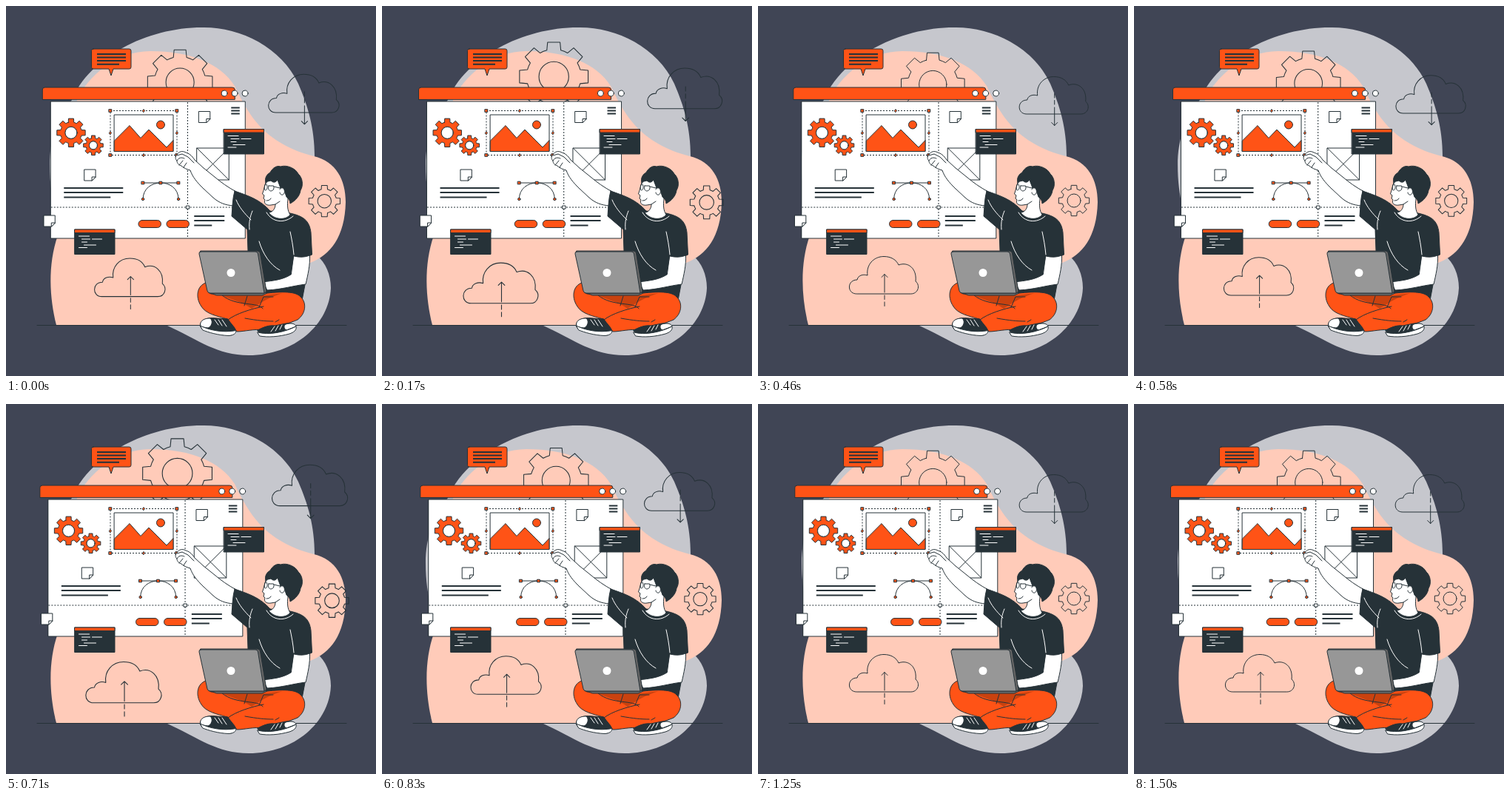
Animation of 500 by 500 pixels, one loop 1540 ms. Source, as an HTML page:

```html
<!DOCTYPE html>
<html lang="en">
<head>
<meta charset="utf-8">
<title>Designer at work</title>
<style>
  html, body { margin: 0; height: 100%; overflow: hidden; background: #404555; }
  svg { display: block; width: 100vw; height: 100vh; }
  .ink { fill: none; stroke: #263238; stroke-width: 1; stroke-linecap: round; stroke-linejoin: round; }
  .white { fill: #fff; }
  .orange { fill: #ff5316; }
  .dark { fill: #263238; }
  .text { stroke-width: 2; stroke-linecap: butt; }
  .dots { stroke-dasharray: 2 2; stroke-linecap: butt; }
  .light { fill: none; stroke: #fff; stroke-linecap: round; }
</style>
</head>
<body>
<svg viewBox="0 0 500 500">
  <defs>
    <path id="cloud" d="M133 389C120 389 120 370 134 370C135 364 142 362 148 364C146 350 156 338.500 170 338.500C180 338.500 187 343 190 350C203 345 215 355 213 372C220 378 216 389 207 389Z"/>
    <path id="arrow" d="M171 362.500V387M171 391V396.500M171 400V405.500M167 366.500L171 362.500L175 366.500"/>
    <g id="note">
      <path class="white" d="M0 0H15V10L10 15H0Z"/>
      <path class="white" d="M15 10H10V15Z"/>
    </g>
    <g id="code">
      <path class="dark" d="M294.500 166.500H348.500V200H294.500Z"/>
      <path class="orange" d="M294.500 166.500H348.500V171H294.500Z"/>
      <path class="light" d="M300 175.500H314M304 179.500H315M318 179.500H331M304 183.500H311M307 187.500H323M300 191H311"/>
    </g>
    <path id="handle" d="M-1.800-1.800H1.800V1.800H-1.800Z"/>
    <path id="diamond" d="M-1.500 0L0-2L1.500 0L0 2Z"/>
  </defs>

  <path fill="#c6c7cd" d="M265 29C315 28 372 55 395 105C408 135 417 165 417 203L420 337C432 347 439 363 439 381C437 430 390 472 328 472C285 472 262 452 216 431C110 390 59 310 59 215C59 180 70 150 89 127C112 70 190 29 265 29Z"/>
  <path fill="#ffcbb9" d="M68 431C59 395 56 350 70 310L96 127C110 95 150 61 195 61C250 61 290 78 309 108C328 148 350 186 416 203C446 210 459 235 459 265C458 312 438 337 411 347C370 365 380 420 300 431Z"/>
  <path class="ink" d="M42 431.500H460"/>

  <g id="pulse" class="ink">
    <path data-gear="236.300 106 43.500 34 18.600"/>
    <path data-gear="427 263 21 16 9"/>
    <use href="#cloud"/>
    <use href="#arrow"/>
    <use href="#cloud" x="229.700" y="-243"/>
    <use href="#arrow" transform="matrix(1 0 0 -1 229.700 524)"/>
  </g>

  <g id="page" class="ink">
    <path class="orange" d="M49.500 126V113Q49.500 110 53 110H306Q309.500 110 309.500 113V126Z"/>
    <g class="white">
      <circle cx="295.300" cy="118" r="4"/><circle cx="309.300" cy="118" r="4"/><circle cx="323.300" cy="118" r="4"/>
      <path d="M60.800 129H323.500V314H60.800Z"/>
    </g>
    <path class="dots" d="M245.700 130V314M61 272H323"/>
    <path class="white" d="M244 270h4v4h-4Z"/>
    <path class="text" d="M304.500 137.500h11.500m-11.500 4h11.500m-11.500 4h11.500M78.500 246h80m-80 6h80m-80 6.500h63M254.500 284h41m-41 6h41m-41 6.500h24"/>
    <path class="orange" data-gear="88.200 171.300 19.500 14.500 8"/>
    <path class="orange" data-gear="118.200 188.300 13.500 10 5.500"/>
    <use href="#note" x="261" y="142.500"/>
    <use href="#note" x="106.300" y="221"/>
    <use href="#note" x="51.500" y="283"/>
    <path d="M258.300 192H301.500V235H258.300ZL301.500 235M301.500 192L258.300 235"/>
    <path d="M185.300 239H233.300M185.300 261C185.300 231.500 233.300 231.500 233.300 261"/>
    <g class="orange">
      <use href="#handle" x="185.300" y="239"/><use href="#handle" x="209.300" y="239"/><use href="#handle" x="233.300" y="239"/>
      <circle cx="185.300" cy="261" r="1.700"/><circle cx="233.300" cy="261" r="1.700"/>
      <rect x="179.200" y="289.500" width="30.500" height="10" rx="5"/>
      <rect x="217.200" y="289.500" width="30.500" height="10" rx="5"/>
    </g>
  </g>

  <g class="ink">
    <path class="dots" d="M141 141.500H231V201.500H141Z"/>
    <path class="white" d="M146.500 147H226V196.500H146.500Z"/>
    <g class="orange">
      <path d="M146.500 182L167 161.500L182 178.500L193 167L217 191L226 181.500V196.500H146.500Z"/>
      <circle cx="209" cy="160.500" r="5.500"/>
      <use href="#handle" x="141" y="141.500"/><use href="#handle" x="231" y="141.500"/>
      <use href="#handle" x="141" y="201.500"/><use href="#handle" x="231" y="201.500"/>
      <use href="#diamond" x="186" y="141.500"/><use href="#diamond" x="186" y="201.500"/>
      <use href="#diamond" x="141" y="171.500"/><use href="#diamond" x="231" y="171.500"/>
      <path d="M118 58H166.500Q169 58 169 60.500V82.500Q169 85 166.500 85H145L142 94L139 85H118Q115.500 85 115.500 82.500V60.500Q115.500 58 118 58Z"/>
    </g>
    <path class="text" d="M123 65h39m-39 4.500h39m-39 4.500h39m-39 4.700h30"/>
    <use href="#code"/>
    <use href="#code" x="-201.500" y="135.500"/>
  </g>

  <g id="man" class="ink">
    <!-- raised arm -->
    <path class="white" d="M311 251C300 245 290 238 282 231L267 219L255 208C251 202 247 199 243 198C238 195 233 197 231 201C228 203 229 208 231 209C231 213 234 215 237 216C240 219 245 221 249 222C252 231 258 238 266 246L280 259C288 266 296 269 307 270Z"/>
    <path d="M231 202L238 200L246 204L254 212M231 209C233 205 237 204 241 206M234 215L239 209M240 218L244 212"/>
    <!-- shirt -->
    <path class="dark" d="M309 250C326 256 343 261 357 277L384 280C402 284 410 290 412 306L413.500 336C406 340 397 340 389 338L387 352L406 366L400 398H345L327 331L326 302L305 284C306 272 306 261 309 250Z"/>
    <path class="light" d="M311 262C315 272 322 280 331 289M329 302C328 292 330 284 333 277M352 279C360 293 377 294 388 284M342 318C347 335 357 350 370 357M389 336C388 325 386 314 384 305"/>
    <!-- head -->
    <path class="white" d="M353 232C350 241 349 247 346.500 254L349 256L348 260L350 262C348 267 352 270 358 269L364 268C364 274 360 279 355 279C362 289 378 290 384 282C380 276 380 268 381 261L378 236Z"/>
    <path class="dark" d="M351 239C349 232 353 227 357 225C360 219 366 215 371 217C380 214 392 220 395 227C401 232 402 243 398 249C397 257 391 263 384 267C384 263 382 260 379 258L375 246L371 247C370 242 368 239 367 235C364 239 361 239 358 236L354 237Z"/>
    <path class="white" d="M370 248C372 243 378 247 376 253C374 257 370 255 370 252"/>
    <path d="M350 241.500C348.500 246 349 249 351 249C353 248 354 244 352 241ZM355 243H361.500C363 247 361 250 357.500 250C354 249 354 245 355 243ZM362 244L370 246M352 263C355 263 357 262 358 260M364 268L370 264"/>
    <!-- trousers -->
    <path class="orange" d="M274 373C258 375 255 393 264 406C270 416 285 419 299 423L304 431L312 440C322 440 336 436 347 438C365 434 382 429 394 424C405 416 407 401 398 393C392 386 375 385 345 389H277Z"/>
    <path fill="#c9420f" stroke="none" d="M292 391H350L374 388C357 393 345 400 332 409C320 400 307 398 292 391Z"/>
    <path d="M292 391C312 407 340 399 347 409M300 424C310 416 332 409 348 406M323 422C340 425 350 426 361 426M364 427L369 424M322 405L326 392M342 407L348 393L361 393"/>
    <!-- forearm -->
    <path class="white" d="M389 338Q401 341 410.500 337C411 350 408 363 405 376C388 378 373 383 353 384L347 373C362 371 374 370 385 363Z"/>
    <!-- shoes -->
    <path class="dark" d="M263 429C265 421 279 421 285 422L300 423C304 430 310 434 311 440L304 445C290 444 274 441 266 437C262 434 262 431 263 429Z"/>
    <path class="white" d="M263 428C265 423 271 422 276 422C280 426 278 431 275 434C272 436 268 434 263 433Z"/>
    <path class="white" d="M262.500 432C274 438 293 442 311 438.500C311 443 307 445 301 445.500C287 445 273 441 266 438Z"/>
    <path class="light" d="M282 424L287 431M287 424L292 432M292 424L298 433"/>
    <path class="dark" d="M340 438C348 434 355 431 363 432L378 429C388 428 392 431 391 436C386 443 365 448 345 446Z"/>
    <path class="white" d="M378 430C385 428 391 429 392 433L379 438C375 436 375 432 378 430Z"/>
    <path class="white" d="M340 441C356 445 376 441 392 433C393 438 389 441 383 443C369 447 354 448 343 446Z"/>
    <path class="light" d="M363 433L358 440M368 432L364 439M373 431L370 437"/>
    <!-- laptop -->
    <path fill="#6d6d6d" d="M274 387H351L352 388.500L346 391H285Z"/>
    <path fill="#666" d="M263 331H340Q343 331 343.500 334L352 386L349 388H275Z"/>
    <path fill="#979797" d="M263 332H337Q340 332 340.500 335L349 388H276Q273 388 272 385L261 335Q260.500 332 263 332Z"/>
    <circle cx="304" cy="360.500" r="5.500" fill="#fff" stroke="none"/>
  </g>
</svg>
<script>
const FPS = 24, LOOP = 1540, CYCLE = 1500, LEAD = 35;
const beat = [[0, 1], [.1, 1.1], [.3, 1], [.4, 1], [.5, 1.1], [.6, 1], [1, 1]];
const shake = [0, -1, 2, -4, 4, -4, 4, -4, 2, -1, 0].map((x, i) => [i / 10, x]);
const pulse = document.getElementById('pulse');
const page = document.getElementById('page');

function gearPath(cx, cy, outer, root, hole) {
  const at = (r, a) => `${cx + r * Math.sin(a)} ${cy - r * Math.cos(a)}`;
  const arc = `A${root} ${root} 0 0 1 `;
  let d = '';
  for (let i = 0; i < 8; i++) {
    const a = i * Math.PI / 4;
    d += `${i ? arc : 'M'}${at(root, a - .26)}L${at(outer, a - .18)}L${at(outer, a + .18)}L${at(root, a + .26)}`;
  }
  return `${d}${arc}${at(root, -.26)}ZM${cx + hole} ${cy}a${hole} ${hole} 0 1 0 ${-2 * hole} 0a${hole} ${hole} 0 1 0 ${2 * hole} 0Z`;
}

for (const el of document.querySelectorAll('[data-gear]')) {
  const gear = el.dataset.gear.split(' ').map(Number);
  const [cx, cy, , , hole] = gear;
  el.setAttribute('d', gearPath(...gear));
  if (el.classList.contains('orange')) {
    el.insertAdjacentHTML('afterend', `<circle class="white" cx="${cx}" cy="${cy}" r="${hole}"/>`);
  }
}

// Linear interpolation through [position, value] keys
function track(keys, p) {
  const i = Math.max(1, keys.findIndex(k => k[0] >= p));
  const [p0, v0] = keys[i - 1], [p1, v1] = keys[i];
  return v0 + (v1 - v0) * (p - p0) / (p1 - p0);
}

function draw(now) {
  const step = Math.floor((now % LOOP + 5) * FPS / 1000) % 37;
  const p = Math.min(1, (step * 1000 / FPS + LEAD) / CYCLE);
  pulse.setAttribute('transform', `translate(285.8 234) scale(${track(beat, p)}) translate(-285.8 -234)`);
  page.setAttribute('transform', `translate(${track(shake, p)})`);
  requestAnimationFrame(draw);
}
draw(performance.now());
</script>
</body>
</html>
```
